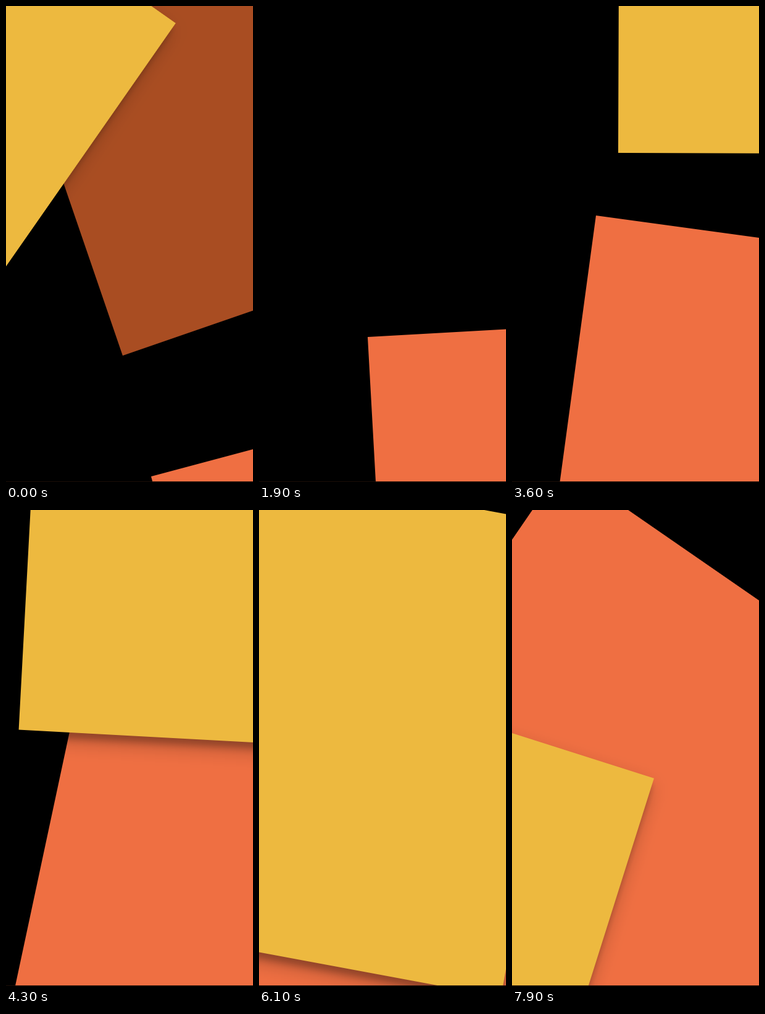
Write an HTML page that moves like this. It is 400 by 768 pixels and loops after 8000 ms.

```html
<!DOCTYPE html>
<html lang="en">
<head>
<meta charset="utf-8">
<title>Drifting paper</title>
<style>
  html, body {
    margin: 0;
    width: 100%;
    height: 100%;
    overflow: hidden;
    background: #000;
  }
  .stage {
    position: fixed;
    inset: 0;
    overflow: hidden;
  }
  /* thin dark rim along the bottom */
  .stage::after {
    content: "";
    position: absolute;
    left: 0;
    right: 0;
    top: 767px;
    height: 1px;
    background: #1a0d06;
  }
  /* each sheet is centred on the origin, so translate() places its centre */
  .sheet {
    position: absolute;
    left: -384px;
    top: -384px;
    width: 768px;
    height: 768px;
    box-shadow: 0 14px 28px rgba(0, 0, 0, .25), 0 10px 10px rgba(0, 0, 0, .22);
    animation: 8s steps(80) -1ms infinite;
  }
  .orange { background: #ef6f42; animation-name: rise; }
  .brown  { background: #a94d22; animation-name: leave-right; }
  .yellow { background: #edb93f; }
  .first  { animation-name: leave-left; }
  .second { animation-name: fall; }

  /* motion ticks ten times a second */
  @keyframes rise {
    0%     { transform: translate(704.8px, 1031.4px) rotate(-14.9deg); animation-timing-function: steps(19); }
    23.75% { transform: translate(580.8px, 896px) rotate(-3.2deg); animation-timing-function: steps(17); }
    45%    { transform: translate(464.7px, 770.3px) rotate(7.75deg); animation-timing-function: steps(13); }
    61.25% { transform: translate(378px, 676.5px) rotate(15.85deg); animation-timing-function: steps(21); }
    87.5%  { transform: translate(241.1px, 524.9px) rotate(28.95deg); animation-timing-function: steps(9); }
    98.75% { transform: translate(181.4px, 461.6px) rotate(34.55deg); animation-timing-function: steps(1); }
    100%   { transform: translate(174.7px, 454.5px) rotate(35.2deg); }
  }
  @keyframes fall {
    0%     { transform: translate(1234px, -848px) rotate(-14.6deg); animation-timing-function: steps(36); }
    45%    { transform: translate(557.3px, -145.7px) rotate(.2deg); animation-timing-function: steps(13); }
    61.25% { transform: translate(311px, 109.5px) rotate(5.55deg); animation-timing-function: steps(12); }
    76.25% { transform: translate(84px, 338.5px) rotate(10.5deg); animation-timing-function: steps(9); }
    87.5%  { transform: translate(-85.9px, 512px) rotate(14.1deg); animation-timing-function: steps(9); }
    98.75% { transform: translate(-252.2px, 682.8px) rotate(17.6deg); animation-timing-function: steps(1); }
    100%   { transform: translate(-271px, 701.5px) rotate(18deg); }
  }
  @keyframes leave-right {
    from { transform: translate(427px, 76px) rotate(-19deg); }
    to   { transform: translate(1947px, -1444px) rotate(13deg); }
  }
  @keyframes leave-left {
    from { transform: translate(-260px, 122px) rotate(35deg); }
    to   { transform: translate(-1940px, -1558px) rotate(67deg); }
  }
</style>
</head>
<body>
<div class="stage">
  <div class="sheet orange"></div>
  <div class="sheet brown"></div>
  <div class="sheet yellow first"></div>
  <div class="sheet yellow second"></div>
</div>
</body>
</html>
```
